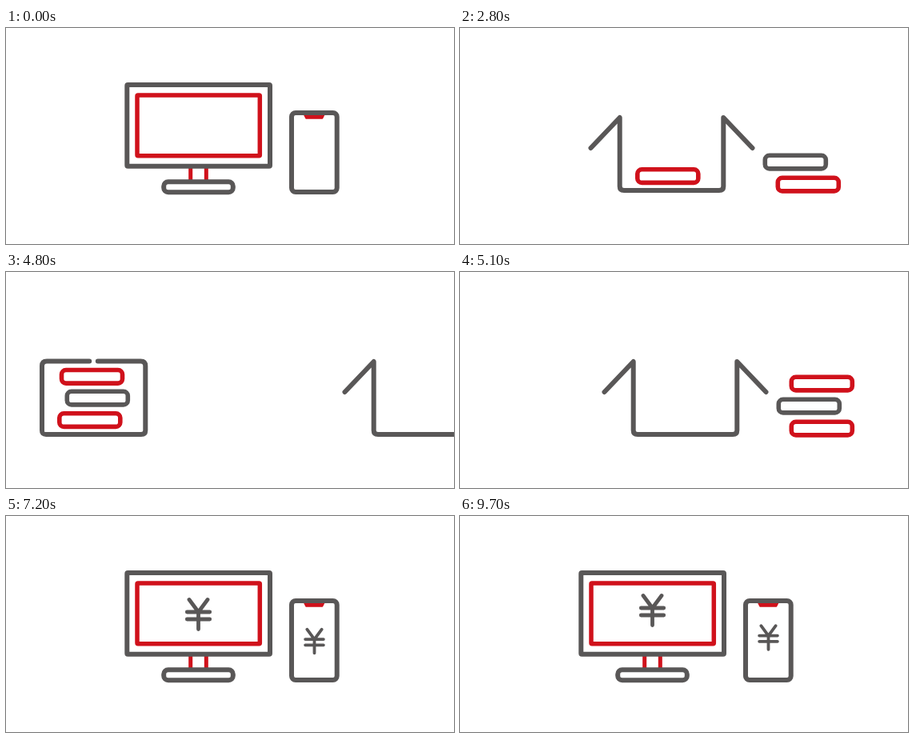
An HTML page that plays this animation: 560 by 270 pixels, repeating every 9.8 s.

```html
<!DOCTYPE html>
<html lang="en">
<head>
<meta charset="utf-8">
<title>Order, pack, pay</title>
<style>
  html, body { margin: 0; width: 100%; height: 100%; overflow: hidden; background: #fff; }
  svg { display: block; width: 560px; height: 270px; }
  .line { fill: none; stroke-width: 6; stroke-linecap: round; stroke-linejoin: round; }
  .grey { stroke: #595757; }
  .red { stroke: #d0111b; }
  .solid { fill: #d0111b; stroke: #d0111b; stroke-linejoin: round; }
</style>
</head>
<body>
<svg viewBox="0 0 560 270">
  <defs>
    <clipPath id="screenClip"><rect x="167" y="86.5" width="147" height="71"/></clipPath>
    <clipPath id="phoneClip"><rect x="360" y="109" width="51" height="93.5"/></clipPath>
    <path id="yen" class="line grey" style="stroke-width:4.8"
      d="M-11.5-18.5 0-3 11.5-18.5M0-3V18.5M-14.2-3H14.2M-14.2 6H14.2"/>
  </defs>

  <g id="devices">
    <g id="monitor">
      <path class="line red" style="stroke-width:5;stroke-linecap:butt" d="M230.7 174V192M250.3 174V192"/>
      <rect class="line grey" x="151.3" y="71" width="178.7" height="101.7" rx="1"/>
      <rect class="line red" style="stroke-width:5.5" x="164" y="84" width="153.3" height="75.7" rx="1"/>
      <rect class="line grey" x="197.2" y="192.2" width="86.6" height="13" rx="5.5"/>
    </g>
    <g clip-path="url(#screenClip)"><use id="yenBig" href="#yen"/></g>
    <g clip-path="url(#phoneClip)"><use id="yenSmall" href="#yen"/></g>
    <path class="solid" stroke-width="1.5" d="M372.5 108H398L395.5 113H375Z"/>
    <rect class="line grey" x="357" y="106" width="56.7" height="99" rx="5"/>
    <path id="cursor" class="solid" stroke-width="4"
      d="M223 105 250 113 243.5 119 257 132.5 250.5 139 237 125.5 231 132Z"/>
  </g>
</svg>

<script>
const LOOP = 9800, TICK = 100;
const svg = document.querySelector('svg');
const $ = id => document.getElementById(id);

// Steps taken at time t by a move that starts at `start` and has n steps.
const steps = (t, start, n) =>
  Math.max(0, Math.min(n, Math.floor((t - start) / TICK) + 1));
const easeInOut = p => p < .5 ? 2 * p * p : 1 - 2 * (1 - p) ** 2;
const show = (el, on) => { el.style.display = on ? '' : 'none'; };
const move = (el, x, y, extra = '') =>
  el.setAttribute('transform', `translate(${x} ${y}) ${extra}`);

function add(parent, tag, attrs) {
  const el = document.createElementNS('http://www.w3.org/2000/svg', tag);
  for (const key in attrs) el.setAttribute(key, attrs[key]);
  return parent.appendChild(el);
}

const SQUASH = [1, .95, .9, .95, 1.05, 1.1, 1];
const FLAPS = [[-36.2, 38], [-40, -41], [0, -58], [42, -42], [59.5, 0]];
const SLIDE = [0, 17, 68, 155, 260, 347, 398, 415];
const YEN_IN = [-65, -45, -22, -5, 5, 0];
const YEN_CYCLE = [0, 18, 48, -45, -22, -5, 5, 0];
const PARCELS = [
  { color: 'red', from: [394.5, 128.5], to: [219, 174] },
  { color: 'grey', from: [378.5, 156.5], to: [228.5, 146.5] },
  { color: 'red', from: [394.5, 184.5], to: [221.7, 119.7] }
];

function boxPath(k) {
  const [dx, dy] = FLAPS[k];
  const closed = k === FLAPS.length - 1;
  const y = closed ? 111.5 : 112;
  const left = closed ? `H206Q200 ${y} 200 ${y + 6}` : `L199.7 ${y}`;
  const right = closed ? `V${y + 6}Q329.3 ${y} 323.3 ${y}` : `V${y}`;
  return `M${199.7 + dx} ${y + dy}${left}V198Q199.7 203 205 203H324Q329.3 203 329.3 198` +
    `${right}L${329.3 - dx} ${y + dy}`;
}

function makePacking() {
  const group = add(svg, 'g', {});
  const box = add(group, 'path', { class: 'line grey' });
  const parcels = PARCELS.map(p => add(group, 'rect', {
    class: 'line ' + p.color, style: 'stroke-width:5.6',
    x: 2.8, y: 2.8, width: 76, height: 16.6, rx: 5.5
  }));
  return { group, box, parcels };
}

function drawPacking(scene, t, firstHop, x, flap) {
  move(scene.group, x, 0);
  scene.box.setAttribute('d', boxPath(flap));
  scene.parcels.forEach((el, i) => {
    const { from, to } = PARCELS[i];
    move(el, ...(t >= firstHop + 200 * i ? to : from));
  });
}

function drawDevices(t) {
  const squash = SQUASH[steps(t, 1200, 6)];
  $('monitor').setAttribute('transform', `translate(0 208) scale(1 ${squash}) translate(0 -208)`);

  show($('cursor'), t >= 200 && t < 2400);
  const left = 1 - easeInOut(steps(t, 300, 7) / 7);
  move($('cursor'), 47 * left, 11 * left);

  const paying = t >= 6800;
  show($('yenBig'), paying);
  show($('yenSmall'), paying);
  const dy = t < 7500
    ? YEN_IN[steps(t, 6800, 5)]
    : YEN_CYCLE[steps((t - 7500) % 900, 0, 7)];
  move($('yenBig'), 240.5, 123 + dy);
  move($('yenSmall'), 385.5, 156.5 + dy * .9, 'scale(.8)');
}

const first = makePacking(), second = makePacking();

function draw(t) {
  const fade = t < 6200 ? steps(t, 1900, 6) / 6 : 0;
  const slide = SLIDE[steps(t, 4600, 7)];

  show($('devices'), fade < 1);
  $('devices').style.opacity = 1 - fade;
  drawDevices(t);

  show(first.group, t >= 1900 && t < 5200);
  first.group.style.opacity = fade;
  drawPacking(first, t, 2800, -slide, steps(t, 3500, 4));

  show(second.group, t >= 4600 && t < 6200);
  drawPacking(second, t, 5600, 415 - slide, 0);
}

const began = performance.now();
function frame() {
  draw((performance.now() - began) % LOOP);
  requestAnimationFrame(frame);
}
frame();
</script>
</body>
</html>
```
